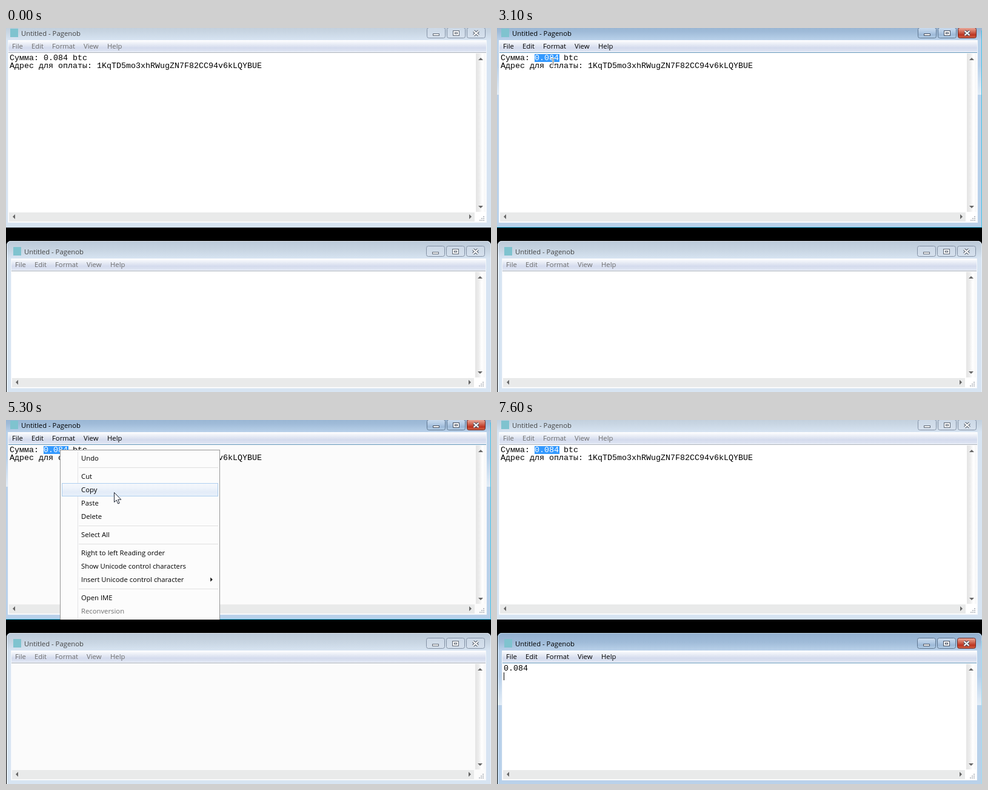
An HTML page with a canvas that plays this animation: 800 by 600 pixels, repeating every 8000 ms.

```html
<!DOCTYPE html>
<html lang="en">
<head>
<meta charset="utf-8">
<style>
html, body { margin: 0; width: 100%; height: 100%; overflow: hidden; background: #000; }
canvas { display: block; }
</style>
</head>
<body>
<canvas id="stage" width="800" height="600"></canvas>
<script>
const ctx = document.getElementById('stage').getContext('2d');
const UI = '11.3px "Open Sans", sans-serif';
const MONO = '13.33px "Liberation Mono", monospace';
const LOOP = 8000, STEP = 100;
const SUM = 'Сумма: 0.084 btc';
const ADDRESS = 'Адрес для оплаты: 1KqTD5mo3xhRWugZN7F82CC94v6kLQYBUE';

// Pointer path: time, x, y
const PATH = [
  [0, 4, -24], [100, 6, -8], [500, 32, 18], [900, 66, 46], [1300, 70, 49], [1600, 70, 49],
  [2200, 106, 50], [2300, 106, 50], [2500, 103, 49], [2900, 76, 50], [3100, 92, 56],
  [3500, 90, 52], [3700, 90, 52], [3900, 89, 50], [4100, 90, 51], [4700, 166, 133],
  [4900, 174, 165], [5000, 175, 142], [5100, 176, 115], [5300, 178, 119], [5900, 178, 119],
  [6300, 71, 434], [6700, 71, 435], [6900, 77, 445], [7000, 86, 470], [7200, 108, 505],
  [7300, 118, 520], [8000, 118, 520]
];

// Menu rows: label and centre offset from the menu's top
const ITEMS = [
  ['Undo', 14], ['Cut', 44], ['Copy', 66], ['Paste', 88], ['Delete', 110], ['Select All', 140],
  ['Right to left Reading order', 170], ['Show Unicode control characters', 192],
  ['Insert Unicode control character', 214], ['Open IME', 244], ['Reconversion', 266]
];
const RULES = [29, 125, 155, 229];

function rect(x, y, w, h, color) {
  ctx.fillStyle = color;
  ctx.fillRect(x, y, w, h);
}

function box(x, y, w, h, color) {
  ctx.strokeStyle = color;
  ctx.lineWidth = 1;
  ctx.strokeRect(x + .5, y + .5, w - 1, h - 1);
}

function fade(x0, y0, x1, y1, ...colors) {
  const g = ctx.createLinearGradient(x0, y0, x1, y1);
  colors.forEach((c, i) => g.addColorStop(i / (colors.length - 1), c));
  return g;
}

function text(s, x, y, color = '#000', font = UI) {
  ctx.font = font;
  ctx.fillStyle = color;
  ctx.fillText(s, x, y);
}

function poly(points, fill, stroke) {
  ctx.beginPath();
  points.forEach(([x, y]) => ctx.lineTo(x, y));
  ctx.closePath();
  ctx.fillStyle = fill;
  ctx.fill();
  if (stroke) {
    ctx.strokeStyle = stroke;
    ctx.lineWidth = 1;
    ctx.stroke();
  }
}

// Small triangle pointing along (dx, dy)
function tri(x, y, dx, dy, color, s = 4) {
  const h = s / 2;
  poly([[x + dx * h, y + dy * h], [x - dx * h + dy * s, y - dy * h + dx * s],
        [x - dx * h - dy * s, y - dy * h - dx * s]], color);
}

function button(x, y, kind, active) {
  const red = active && kind === 2;
  const fill = red ? fade(0, y, 0, y + 17, '#e8a698', '#d4705c', '#bd3320', '#d66e50')
    : active ? fade(0, y, 0, y + 17, '#c9dbee', '#b6cde6', '#9db9d8', '#b8d2ea')
    : fade(0, y, 0, y + 17, '#ccd8e6', '#d6e1ed');
  ctx.beginPath();
  ctx.roundRect(x + .5, y - .5, 30, 17, 3);
  ctx.fillStyle = fill;
  ctx.fill();
  ctx.strokeStyle = red ? '#6b2a28' : active ? '#5f7690' : '#8492a6';
  ctx.lineWidth = 1;
  ctx.stroke();
  const ink = active ? '#4a5363' : '#626b78';
  if (kind === 0) {
    rect(x + 10, y + 9, 11, 4, '#f8f8f8');
    box(x + 10, y + 9, 11, 4, ink);
  } else if (kind === 1) {
    rect(x + 10, y + 4, 11, 9, '#f8f8f8');
    box(x + 10, y + 4, 11, 9, ink);
    box(x + 13, y + 7, 5, 3, ink);
  } else {
    for (const [w, c] of [[4.4, ink], [2.2, '#fff']]) {
      ctx.strokeStyle = c;
      ctx.lineWidth = w;
      ctx.beginPath();
      ctx.moveTo(x + 11.5, y + 5); ctx.lineTo(x + 19.5, y + 12);
      ctx.moveTo(x + 19.5, y + 5); ctx.lineTo(x + 11.5, y + 12);
      ctx.stroke();
    }
  }
}

// (x, y) shifts the chrome; right and bottom are the edges of the inner area
function editor(x, y, right, bottom, active, page) {
  const left = x + 4, width = right - left;
  const frame = active ? '#b9d1ea' : '#d7e4f2';
  rect(0, y - 10, 800, bottom - y + 30, frame);
  rect(0, y - 10, 800, 30, active
    ? fade(0, y - 8, 0, y + 20, '#93b0cf', '#9fbbd8', '#b9d1ea')
    : fade(0, y - 8, 0, y + 20, '#bccad9', '#c8d5e2', '#d7e4f2'));
  if (active) {
    const glow = fade(0, y + 62, 0, y + 110, 'rgba(255,255,255,0)', 'rgba(255,255,255,.6)');
    rect(0, y + 62, left, 48, glow);
    rect(right, y + 62, 800 - right, 48, glow);
    rect(799, y + 4, 1, bottom - y + 10, '#43c3e6');
  }
  rect(x + 7, y + 1, 13, 14, '#7fc3cf');
  text('Untitled - Pagenob', x + 25, y + 13, active ? '#000' : '#444');
  for (let i = 0; i < 3; i++) button(right - 98 + i * 33, y, i, active);

  rect(left - 1, y + 20, width + 2, bottom - y - 20, '#f3f6fa');
  rect(left, y + 20, width, 19, fade(0, y + 20, 0, y + 39, '#fff', '#e9edf6', '#d4dbed', '#dfe5f3'));
  rect(left, y + 39, width, 1, '#f4f6fb');
  rect(left, y + 40, width, 1, active ? '#5e93b8' : '#a5adb8');
  [['File', 10], ['Edit', 42], ['Format', 76], ['View', 128], ['Help', 167]]
    .forEach(([s, dx]) => text(s, x + dx, y + 34, active ? '#000' : '#6d6d6d'));

  rect(left, y + 41, width, bottom - y - 42, page);
  rect(right - 17, y + 42, 16, bottom - y - 60, fade(right - 17, 0, right - 1, 0, '#e4e4e4', '#ececec', '#fff', '#f6f6f6'));
  rect(left + 1, bottom - 17, width - 20, 15, '#e9eaea');
  tri(right - 9, y + 51, 0, -1, '#666');
  tri(right - 9, bottom - 26, 0, 1, '#666');
  tri(left + 9, bottom - 10, -1, 0, '#666');
  tri(right - 26, bottom - 10, 1, 0, '#666');
  for (let i = 0; i < 3; i++)
    for (let j = 0; j <= i; j++) rect(right - 5 - j * 3, bottom - 11 + i * 3, 2, 2, '#bcc0c6');
}

function menu(x, y, disabled, pointer) {
  rect(x, y, 264, 300, '#fcfcfc');
  box(x, y, 264, 300, '#979797');
  rect(x + 29, y + 3, 1, 290, '#e3e4e6');
  RULES.forEach(dy => rect(x + 31, y + dy, 230, 1, '#e0e0e0'));
  ITEMS.forEach(([label, dy], i) => {
    const top = y + dy - 11;
    if (pointer.x > x + 2 && pointer.y >= top && pointer.y < top + 22) {
      rect(x + 3, top, 258, 22, fade(0, top, 0, top + 22, '#f6f8fc', '#eff4fb', '#e3ecf8', '#e8f0fa'));
      box(x + 3, top, 258, 22, '#aecff0');
    }
    text(label, x + 35, y + dy + 4, disabled.includes(i) ? '#6d6d6d' : '#000');
  });
  tri(x + 250, y + 214, 1, 0, '#000', 3.5);
}

function arrow({ x, y }) {
  const shape = [[0, 0], [0, 16], [3.7, 12.5], [6.3, 18.5], [8.7, 17.5], [6.2, 11.7], [11.3, 11.7]];
  poly(shape.map(([a, b]) => [x + a + .5, y + b + .5]), '#fff', '#1c2433');
}

function ibeam({ x, y }) {
  x = Math.round(x);
  y = Math.round(y);
  rect(x - 1, y - 6, 3, 13, '#fff');
  rect(x - 3, y - 7, 7, 2, '#fff');
  rect(x - 3, y + 6, 7, 2, '#fff');
  rect(x, y - 5, 1, 11, '#555');
  rect(x - 2, y - 6, 2, 1, '#777');
  rect(x + 1, y - 6, 2, 1, '#777');
}

function pointerAt(t) {
  const i = Math.max(1, PATH.findIndex(p => p[0] >= t));
  const [t0, x0, y0] = PATH[i - 1], [t1, x1, y1] = PATH[i];
  const k = (t - t0) / (t1 - t0);
  return { x: x0 + (x1 - x0) * k, y: y0 + (y1 - y0) * k };
}

function selectionWidth(t) {
  if (t < 1700) return 0;
  if (t < 2400) return 8 * Math.min(6, (t - 1600) / STEP);
  return t >= 5900 && t < 6100 ? 40 : 41;
}

function draw(t) {
  const pointer = pointerAt(t);
  const between = (a, b) => t >= a && t < b;
  const topMenu = between(4100, 5900), lowMenu = between(6700, 7400);
  const page = topMenu ? '#fbfbfb' : between(6700, 7600) ? '#fdfdfd' : '#fff';
  const lowActive = t >= 6300;

  rect(0, 0, 800, 600, '#000');
  const topActive = between(1000, 6300);
  editor(0, 0, 792, 321, topActive, page);
  rect(0, 328, 800, 1, topActive ? '#2fb4df' : '#c3d2e2');
  text(SUM, 6, 53, '#000', MONO);
  text(ADDRESS, 6, 66, '#000', MONO);
  const selected = selectionWidth(t);
  if (selected) {
    ctx.save();
    ctx.beginPath();
    ctx.rect(62, 43, selected, 13);
    ctx.clip();
    rect(62, 43, selected, 13, '#3399ff');
    text(SUM, 6, 53, '#fff', MONO);
    ctx.restore();
  }
  if (topMenu) menu(89, 49, [10], pointer);

  rect(0, 329, 800, 271, '#000');
  ctx.save();
  ctx.beginPath();
  ctx.roundRect(1, 351, 799, 270, 7);
  ctx.clip();
  editor(5, 360, 791, 594, lowActive, page);
  ctx.restore();
  ctx.beginPath();
  ctx.roundRect(1.5, 351.5, 798, 270, 7);
  ctx.strokeStyle = lowActive ? 'rgba(220,240,250,.6)' : 'rgba(245,248,252,.6)';
  ctx.lineWidth = 1;
  ctx.stroke();

  if (t >= 7400) text('0.084', 11, 413, '#000', MONO);
  if (between(6300, 7400)) rect(11, 403, 1, 13, '#000');
  if (t >= 7600) rect(11, 416, 1, 13, '#000');
  if (lowMenu) menu(71, 434, [1, 2, 4, 5], pointer);

  if (between(5900, 6300) || t >= 7400) return;
  if (pointer.y < 41 || between(3800, 5900) || lowMenu) arrow(pointer);
  else ibeam(pointer);
}

const start = performance.now();
function tick() {
  const t = (performance.now() - start) % LOOP;
  draw(Math.floor(t / STEP) * STEP);
  requestAnimationFrame(tick);
}
tick();
</script>
</body>
</html>
```
